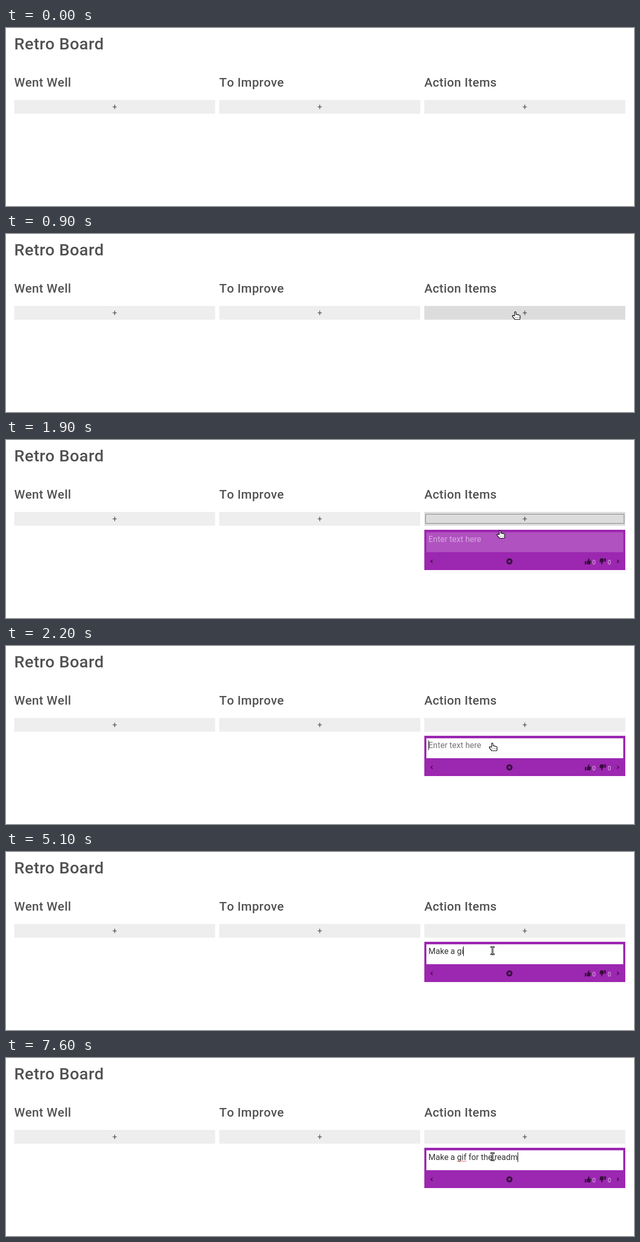
An HTML page for the animation above (8 s loop, 1225x349 px).

```html
<!DOCTYPE html>
<html lang="en">
<head>
<meta charset="utf-8">
<title>Retro Board</title>
<style>
  html, body { margin: 0; width: 100%; height: 100%; overflow: hidden; background: #fff; }
  svg { display: block; width: 1225px; height: 349px; }
  text { font: 16px Roboto, sans-serif; fill: #525252; white-space: pre; }
  .title { font-size: 32px; font-weight: 500; letter-spacing: .5px; }
  .head { font-size: 24px; font-weight: 500; letter-spacing: .4px; font-kerning: none; }
  .plus { text-anchor: middle; }
  .count { font-size: 12px; fill: #dfb6e5; }
  .button { fill: #eee; }
  .icon { fill: #35103c; }
  .line { fill: none; stroke: #35103c; stroke-width: 1.6; }
</style>
</head>
<body>
<svg viewBox="0 0 1225 349">
  <text class="title" x="16" y="42">Retro Board</text>
  <g id="columns"></g>
  <rect id="ring" x="818.5" y="145.5" width="387" height="18" fill="none" stroke="#222" stroke-dasharray="1 1"/>

  <g id="card">
    <rect x="816" y="176" width="392" height="79" fill="#9c27b0"/>
    <rect id="field" x="820" y="181" width="384" height="39"/>
    <text id="note" x="824" y="200"></text>
    <path id="wave" fill="none" stroke="#d33" stroke-width=".9"/>
    <rect id="caret" y="185" width="1" height="19"/>
    <path class="line" d="M832 235l-3 3 3 3"/>
    <circle class="icon" cx="982" cy="238" r="6"/>
    <path d="M979.8 235.8l4.4 4.4m0-4.4l-4.4 4.4" stroke="#9c27b0" stroke-width="1.7"/>
    <g id="icons">
      <path id="thumb" class="icon" d="M1129 237.5h3v6.5h-3zM1133 238l2.5-2.7.7-3.3q2.4.2 1.8 3l-.5 1.5h2.6q1.5.3 1 2l-1 4.2q-.4 1.3-2 1.3h-2.5l-2.6-1z"/>
      <use href="#thumb" transform="rotate(180 1149.5 238)"/>
      <path class="line" d="M1192 235l3 3-3 3"/>
    </g>
    <path id="dashes" d="M1133 239.5h2m28 0h3m27 0h2" stroke="#dfb6e5"/>
    <text class="count" x="1143.6" y="244">0</text>
    <text class="count" x="1173.4" y="244">0</text>
  </g>

  <path id="arrow" d="M.5.5v14l3.3-3 2.2 5 2.2-1-2.2-4.8h4.5z" stroke="#fff"/>
  <g id="hand">
    <path d="M5.2 3q0-1.6 1.3-1.6T8 3v3.6h2.2l.6.7h1.7l.6.7h1.5q1.2.2 1.2 1.5v5q0 2-1.6 2H5.5q-.8-1.6-2-2.4L.8 10.6q-.4-1.6 1.2-1.9l3.2.6z" fill="#fff" stroke="#000" stroke-width="1.2" stroke-linejoin="round"/>
    <path d="M7 12.5h7" stroke="#000" stroke-dasharray="1 2"/>
  </g>
  <g id="beam" fill="none">
    <path id="stem" d="M945 186.5h2.5l1.5 1 1.5-1h2.5m-8 14h2.5l1.5-1 1.5 1h2.5m-4-13v12" stroke="#000" stroke-width="3"/>
    <path d="M945.5 186.5h2l1.5 1 1.5-1h2m-7 14h2l1.5-1 1.5 1h2m-3.5-13v12" stroke="#fff"/>
  </g>
</svg>
<script>
const $ = id => document.getElementById(id);
const LOOP = 8000, STEP = 100;
const message = 'Make a gif for the readm';

$('columns').innerHTML = ['Went Well', 'To Improve', 'Action Items'].map((name, i) => {
  const x = 16 + 400 * i;
  return `<text class="head" x="${x}" y="115">${name}</text>
    <rect class="button" x="${x}" y="141" width="392" height="27"/>
    <text class="plus" x="${x + 196}" y="160">+</text>`;
}).join('');
const button = document.querySelectorAll('.button')[2];
$('wave').setAttribute('d', 'M880 203.5' + 'l2-2l2 2'.repeat(4) + 'l2-2');

// Key points as [time, values...], joined by straight lines
const pointer = [
  [500, 984, 36], [600, 979, 98], [700, 984, 171],
  [900, 987, 151], [1700, 987, 151], [2000, 942, 189]
];
const typing = [
  [3100, 0], [3200, 1], [3700, 2], [4200, 7], [4700, 7], [5100, 9],
  [5600, 12], [6000, 14], [6300, 18], [7000, 22], [7600, 24]
];

function at(keys, t) {
  const next = keys.findIndex(key => key[0] > t);
  if (next < 1) return keys.at(next).slice(1);
  const a = keys[next - 1], b = keys[next];
  const part = (t - a[0]) / (b[0] - a[0]);
  return a.slice(1).map((v, i) => v + (b[i + 1] - v) * part);
}
const within = (t, from, to) => t >= from && t < to;
const show = (id, on) => $(id).style.display = on ? '' : 'none';

function draw(t) {
  const focused = t >= 2200;
  button.style.fill = within(t, 600, 2200) ? '#dcdcdc' : '#eee';
  show('ring', within(t, 1100, 2200));
  show('card', t >= 1200);
  show('icons', t >= 1300);
  show('dashes', t < 1300);
  $('field').style.fill = focused ? '#fff' : t >= 1900 ? '#b052c0' : '#9c27b0';

  const typed = Math.floor(at(typing, t)[0] + 1e-6);
  const note = $('note');
  note.textContent = typed ? message.slice(0, typed) : 'Enter text here';
  note.style.fill = typed ? '#333' : focused ? '#757575' : '#d7a8df';
  $('caret').setAttribute('x', Math.floor(824 + (typed ? note.getComputedTextLength() : 0)));
  show('caret', focused && !within(t, 3500, 3700) && !within(t, 4600, 4900));
  show('wave', typed > message.indexOf(' for'));

  const place = `translate(${at(pointer, t).map(Math.round)})`;
  $('arrow').setAttribute('transform', place);
  $('hand').setAttribute('transform', place);
  show('arrow', within(t, 500, 600));
  show('hand', within(t, 600, 2500));
  show('beam', t >= 2500);
}

let start;
function tick(now) {
  start ??= now;
  draw(Math.floor((now - start) % LOOP / STEP) * STEP);
  requestAnimationFrame(tick);
}
requestAnimationFrame(tick);
</script>
</body>
</html>
```
